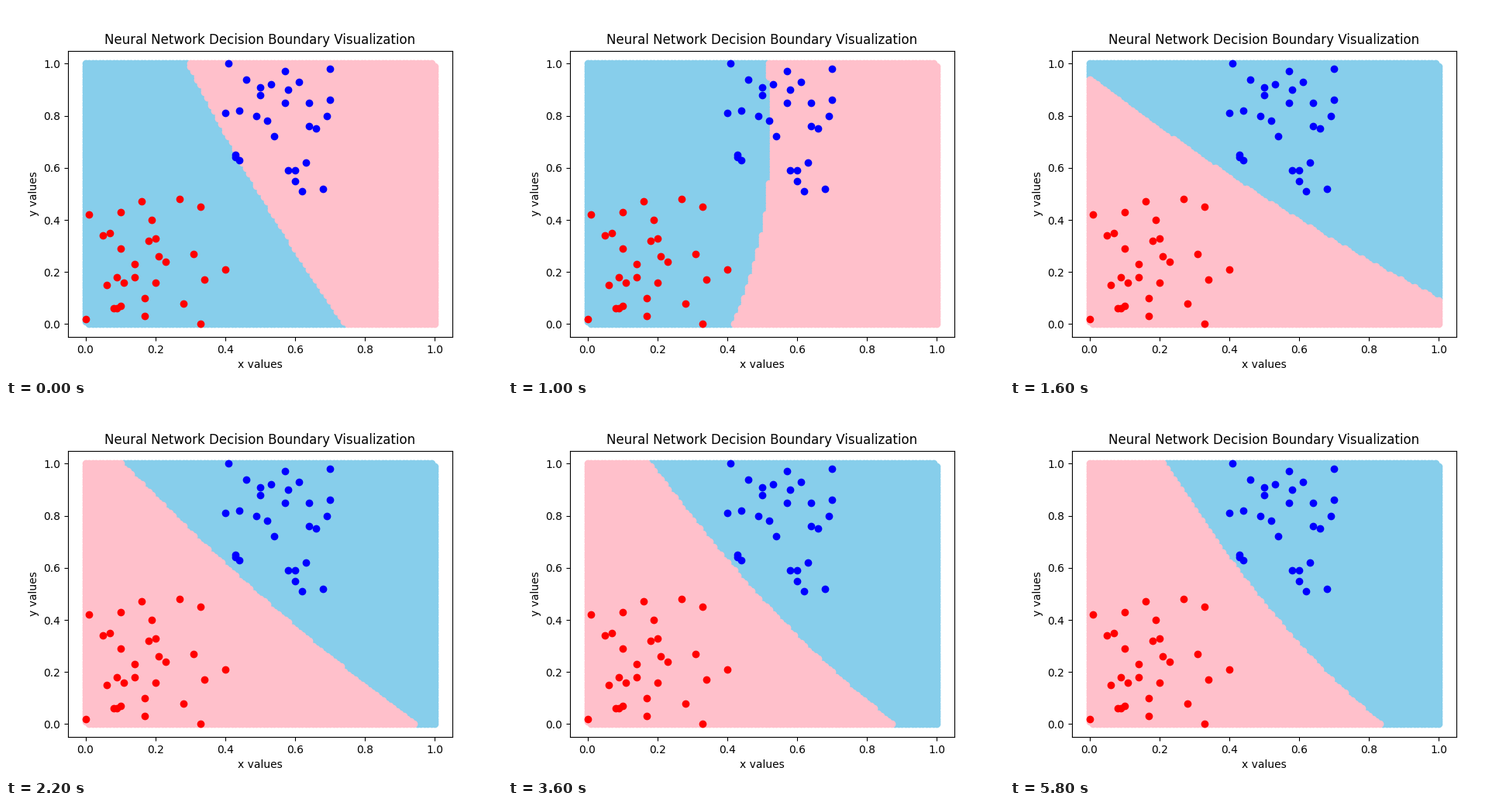
These frames come from a looping animation (640 by 480 pixels, 6 s). A matplotlib script:

```python
import numpy as np
import matplotlib.pyplot as plt
from matplotlib.animation import FuncAnimation

FRAMES = 30
INTERVAL = 200
SWING = 6  # step at which the boundary tips over to its second orientation

# Training samples, in hundredths: x, y
RED = [(1, 42), (0, 2), (5, 34), (7, 35), (10, 43), (16, 47), (19, 40),
       (27, 48), (33, 45), (10, 29), (18, 32), (20, 33), (14, 23), (21, 26),
       (23, 24), (31, 27), (40, 21), (34, 17), (6, 15), (9, 18), (11, 16),
       (14, 18), (20, 16), (17, 10), (8, 6), (9, 6), (10, 7), (17, 3),
       (28, 8), (33, 0)]
BLUE = [(41, 100), (46, 94), (50, 91), (50, 88), (53, 92), (57, 97), (58, 90),
        (61, 93), (57, 85), (70, 98), (70, 86), (64, 85), (69, 80), (64, 76),
        (66, 75), (40, 81), (44, 82), (49, 80), (52, 78), (54, 72), (43, 65),
        (43, 64), (44, 63), (58, 59), (60, 59), (63, 62), (60, 55), (62, 51),
        (68, 52)]

# Early boundary x(y) at y = 0, 1/3, 2/3, 1
EARLY_START = np.array([0.745, 0.5785, 0.430, 0.296])
EARLY_END = np.array([0.418, 0.498, 0.525, 0.517])

# Later boundary y(x): step, then y at x = 0, 1/2, 1
LATE = np.array([
    (6, 0.297, 0.484, 0.740),
    (8, 0.945, 0.478, 0.093),
    (10, 1.100, 0.483, -0.030),
    (12, 1.190, 0.487, -0.085),
    (14, 1.262, 0.485, -0.095),
    (18, 1.343, 0.470, -0.119),
    (22, 1.415, 0.463, -0.124),
    (29, 1.507, 0.455, -0.152),
])

# Grid of classified points, without its two extreme corners
gx, gy = (g.ravel() / 100 for g in np.meshgrid(np.arange(101), np.arange(101)))
inner = (gx + gy > 0) & (gx + gy < 2)
gx, gy = gx[inner], gy[inner]
grid = np.column_stack([gx, gy])


def curve(values, at):
    """Polynomial through values spread evenly over 0..1."""
    nodes = np.linspace(0, 1, len(values))
    return np.polyval(np.polyfit(nodes, values, len(values) - 1), at)


def is_pink(step):
    if step < SWING:
        t = (step / (SWING - 1)) ** 1.5
        return gx >= curve(EARLY_START + t * (EARLY_END - EARLY_START), gy)
    values = [np.interp(step, LATE[:, 0], col) for col in LATE[:, 1:].T]
    return gy <= curve(values, gx)


fig, ax = plt.subplots(figsize=(6.4, 4.8), dpi=100)
ax.set_xlim(-0.05, 1.05)
ax.set_ylim(-0.05, 1.05)
ax.set_title("Neural Network Decision Boundary Visualization")
ax.set_xlabel("x values")
ax.set_ylabel("y values")

sky = ax.scatter([], [], color="skyblue")
pink = ax.scatter([], [], color="pink")
for samples, color in ((RED, "red"), (BLUE, "blue")):
    ax.scatter(*(np.array(samples).T / 100), color=color)


def update(step):
    mask = is_pink(step)
    sky.set_offsets(grid[~mask])
    pink.set_offsets(grid[mask])
    return sky, pink


anim = FuncAnimation(fig, update, frames=FRAMES, interval=INTERVAL,
                     repeat=True, repeat_delay=0)
plt.show()
```
